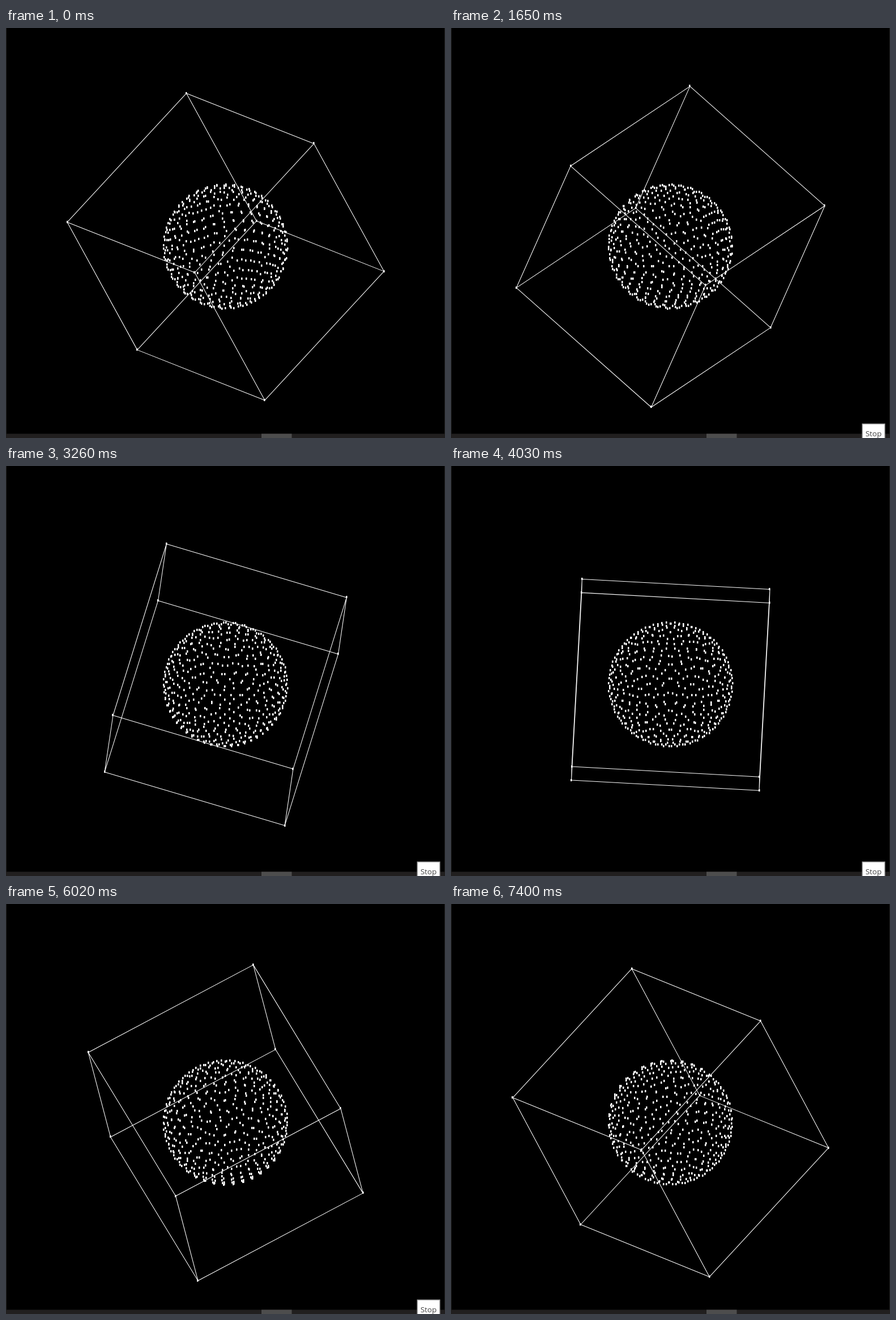
An HTML page with a canvas that plays this animation: 775 px wide and 723 px high, repeating every 7.48 s.

```html
<!DOCTYPE html>
<html lang="en">
<head>
<meta charset="utf-8">
<title>Rotating cube and sphere</title>
<style>
  html, body { margin: 0; width: 100%; height: 100%; overflow: hidden; background: #000; }
  canvas { display: block; }
</style>
</head>
<body>
<canvas id="stage" width="775" height="723"></canvas>
<script>
const ctx = document.getElementById('stage').getContext('2d');
const LOOP = 7480, STEPS = 96;
const CX = 387.7, CY = 385.8, HALF = 166, RADIUS = 109.5, POINTS = 500;

// The turn runs a little slower from step 52 to step 77
function angleAt(step) {
  const slow = Math.min(Math.max(step - 52, 0), 25);
  return (104.8 - 1.93 * step + 0.113 * slow + 0.063 * Math.max(step - 77, 0)) * Math.PI / 180;
}

const corners = Array.from({ length: 8 }, (_, i) =>
  [1, 2, 4].map(bit => i & bit ? HALF : -HALF));

// Golden-spiral sphere with its poles on the depth axis
const sphere = Array.from({ length: POINTS }, (_, i) => {
  const z = 1 - (2 * i + 1) / POINTS;
  const r = Math.sqrt(1 - z * z);
  const phi = Math.PI * (1 + Math.sqrt(5)) * (i + 0.5);
  return [r * Math.cos(phi), -r * Math.sin(phi), z].map(v => v * RADIUS);
});

const tilt = ([x, y, z]) => [x, y + 0.00875 * z, z - 0.00875 * y];

// Turn about the diagonal (-1, 0, 1)
function turner(angle) {
  const c = Math.cos(angle), q = Math.sin(angle) / Math.SQRT2;
  const u = (1 + c) / 2, v = (1 - c) / 2;
  return p => {
    const [x, y, z] = tilt(p);
    return tilt([u * x - q * y - v * z, q * x + c * y + q * z, u * z - v * x - q * y]);
  };
}

function box(color, x, y, w, h) {
  ctx.fillStyle = color;
  ctx.fillRect(x, y, w, h);
}

const dot = ([x, y]) => box('#fff', Math.floor(x) - 1, Math.floor(y) - 2, 2.5, 4);

function drawButton(alpha) {
  ctx.globalAlpha = alpha;
  box('#aaa', 725.5, 697.5, 41, 26);
  box('#fff', 727, 699, 38, 24);
  ctx.fillStyle = '#444';
  ctx.font = '13.5px "Open Sans", "Noto Sans", sans-serif';
  ctx.textAlign = 'center';
  ctx.fillText('Stop', 746, 719.5);
  ctx.globalAlpha = 1;
}

function draw(t) {
  const step = Math.min(STEPS - 1, Math.floor(t / LOOP * STEPS + 0.3));
  const turn = turner(angleAt(step));

  box('#000', 0, 0, 775, 723);
  box('#222', 0, 0, 1, 716);
  box('#222', 774, 0, 1, 716);
  box('#211f1f', 0, 715.5, 775, 8);
  box('#4d4d4d', 451, 715.5, 53.5, 8);

  const ends = corners.map(turn).map(([x, y]) => [CX + x, CY + y]);
  ctx.strokeStyle = '#fff';
  ctx.lineWidth = 1.05;
  ctx.beginPath();
  ends.forEach((p, i) => {
    for (const bit of [1, 2, 4]) {
      if (i & bit) continue;
      ctx.moveTo(...p);
      ctx.lineTo(...ends[i | bit]);
    }
  });
  ctx.stroke();
  ends.forEach(dot);

  // The sphere turns a quarter round from the cube
  sphere.map(turn).forEach(([x, y]) => dot([CX - y, CY + x]));

  const alpha = Math.min((t - 180) / 320, (7390 - t) / 250, 1);
  if (alpha > 0) drawButton(alpha);
}

const start = performance.now();
function tick() {
  draw((performance.now() - start) % LOOP);
  requestAnimationFrame(tick);
}
tick();
</script>
</body>
</html>
```
